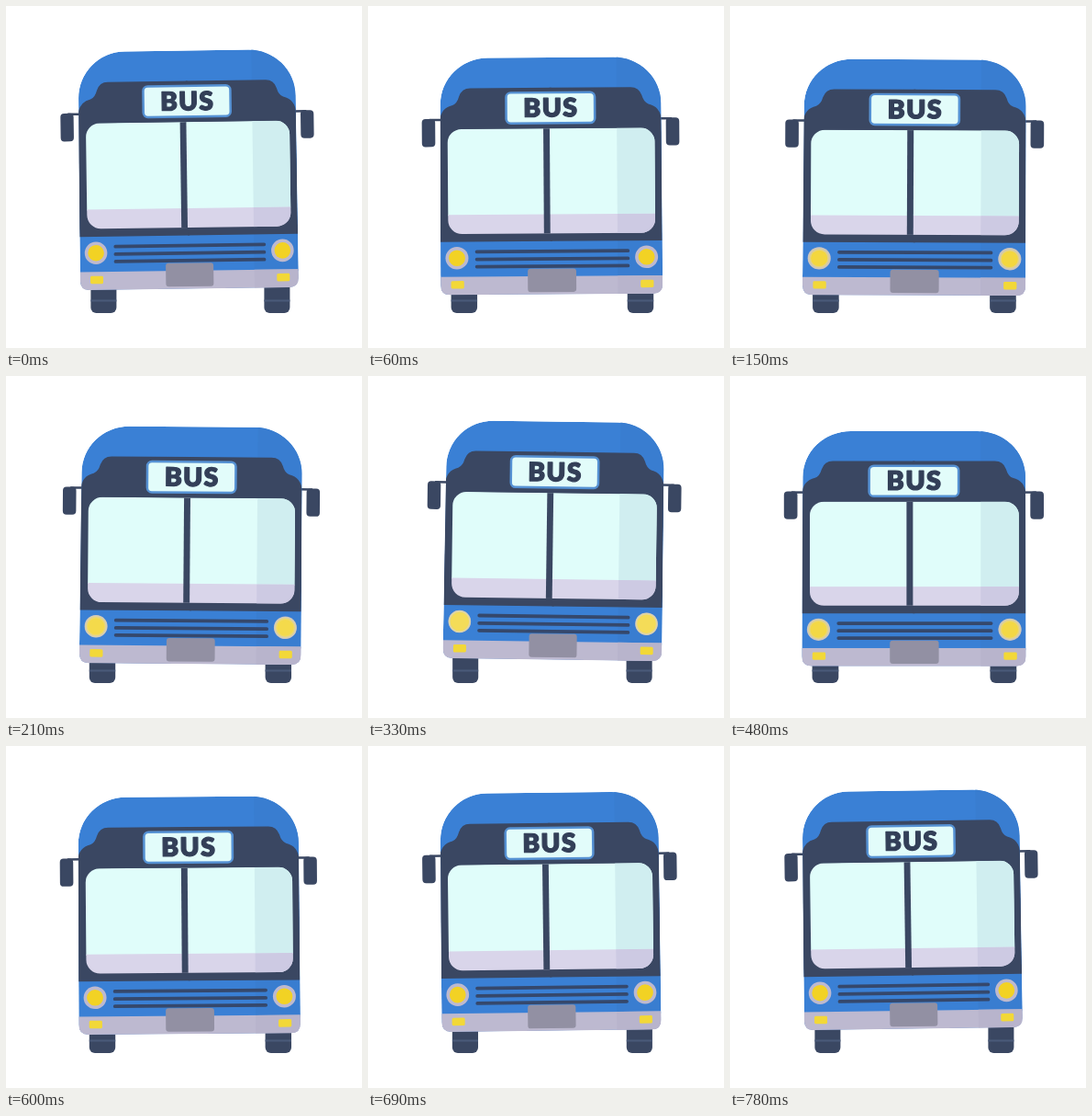
An HTML page for the animation above (0.81 s loop, 388 px wide and 372 px high).

```html
<!DOCTYPE html>
<html lang="en">
<head>
<meta charset="utf-8">
<title>Bouncing bus</title>
<style>
  html, body { margin: 0; width: 100%; height: 100%; overflow: hidden; background: #fff; }
  svg { display: block; width: 100%; height: 100%; }
  text { font: 900 28px Lato, "Open Sans", sans-serif; letter-spacing: 1.3px; }
</style>
</head>
<body>
<svg viewBox="0 0 388 372">
  <defs>
    <clipPath id="shell"><path id="hull" d="M-118 99 A51 50.500 0 0 1 -67 48.500 H67.500 A51 50.500 0 0 1 118.500 99 L119 286 V297 Q119 307.500 109 307.500 H-109 Q-119 307.500 -119 297 V286Z"/></clipPath>
    <clipPath id="glass"><rect x="-110.500" y="126.200" width="222" height="114.800" rx="15"/></clipPath>
    <path id="cowl" d="M1 81.500 H-86 Q-95 81.500 -98 90.500 Q-100 98 -105 100 Q-118 103 -119 118 V249.500 H1Z"/>
    <g id="mirror">
      <path d="M-116 116 H-130" stroke="#3a4762" stroke-width="2.500"/>
      <rect x="-138" y="115" width="14.300" height="30.500" rx="4"/>
    </g>
    <g id="wheel">
      <rect x="-108" y="292" width="28" height="42" rx="6"/>
      <path d="M-108 320.500 H-80" stroke="#4a5a7a" stroke-width="2"/>
    </g>
    <g id="lamp">
      <circle r="12.300" fill="#bdb9cf"/>
      <circle class="glow" r="12" fill="#dfd5a4"/>
      <circle r="8.800" fill="#f2d224"/>
      <circle class="glow" r="10.300" fill="#f4dc58"/>
      <rect x="-6.500" y="25" width="14" height="8.500" rx="1.500" fill="#f2d838"/>
    </g>
  </defs>
  <g transform="translate(200.400)">
    <g id="wheels" fill="#3a4762">
      <use href="#wheel"/>
      <use href="#wheel" transform="translate(1) scale(-1 1)"/>
    </g>
    <g id="body">
      <g fill="#3a4762">
        <use href="#mirror"/>
        <use href="#mirror" transform="scale(-1 1)"/>
      </g>
      <g clip-path="url(#shell)">
        <use href="#hull" fill="#3a80d5"/>
        <rect x="71" y="40" width="60" height="250" fill="#397dd0"/>
        <g fill="#3a4762">
          <use href="#cowl"/>
          <use href="#cowl" transform="scale(-1 1)"/>
        </g>
        <rect x="-120" y="287.800" width="240" height="22" fill="#bdb9d0"/>
        <rect x="71" y="287.800" width="50" height="22" fill="#b8b4cc"/>
      </g>
      <g clip-path="url(#glass)">
        <rect x="-112" y="126" width="224" height="95" fill="#e0fdfa"/>
        <rect x="-112" y="220" width="224" height="22" fill="#d9d5ea"/>
        <rect x="71" y="126" width="42" height="94" fill="#d0eef0"/>
        <rect x="71" y="220" width="42" height="22" fill="#cdcae3"/>
        <rect x="-7.800" y="126" width="6.800" height="116" fill="#3a4762"/>
      </g>
      <rect x="-47.500" y="86.800" width="95" height="33.500" rx="5" fill="#e2fcfa" stroke="#5591d3" stroke-width="2.500"/>
      <text x=".5" y="113.300" text-anchor="middle" fill="#333f58" stroke="#333f58" stroke-width="1.200" stroke-linejoin="round">BUS</text>
      <path d="M-80 260.500 H82 M-80 268.800 H82 M-80 276.800 H82" stroke="#35486c" stroke-width="3.800" stroke-linecap="round"/>
      <use href="#lamp" x="-101.300" y="267.300"/>
      <use href="#lamp" x="102" y="267.300"/>
      <rect x="-25.500" y="279.500" width="52" height="25.500" rx="3" fill="#9290a3"/>
    </g>
  </g>
</svg>
<script>
  const STEP = 30, LOOP = 810, BOUNCE = 390, FALL = 90;
  const body = document.getElementById("body");
  const wheels = document.getElementById("wheels");
  const glows = document.querySelectorAll(".glow");

  // Ease from 0 to 1 with given start and end slopes.
  const hermite = (u, a, b) =>
    a * u + (3 - 2 * a - b) * u * u + (a + b - 2) * u ** 3;

  function draw(now) {
    const t = Math.floor(now % LOOP / STEP) * STEP;
    const p = t % BOUNCE;
    const falling = p < FALL;
    const drop = falling
      ? hermite(p / FALL, 0, .7)
      : 1 - hermite((p - FALL) / (BOUNCE - FALL), .54, 0);

    // The bus leans to alternate sides on each bounce.
    const lean = Math.floor(t / BOUNCE) % 2 ? 1 : -1;
    const angle = .8 * lean * (falling ? 1 : -1) * Math.max(0, 1 - drop) ** .7;
    const wide = 1 + .026 * drop;
    const tall = 1 - .014 * drop ** 2;

    body.setAttribute("transform",
      `rotate(${angle} 0 340) translate(0 ${12.2 * drop}) scale(${wide} ${tall})`);
    wheels.setAttribute("transform", `scale(${wide} 1)`);

    const glow = Math.max(0, Math.sin(Math.PI * (t - 60) / 540));
    for (const g of glows) g.setAttribute("opacity", glow);
    requestAnimationFrame(draw);
  }
  requestAnimationFrame(draw);
</script>
</body>
</html>
```
